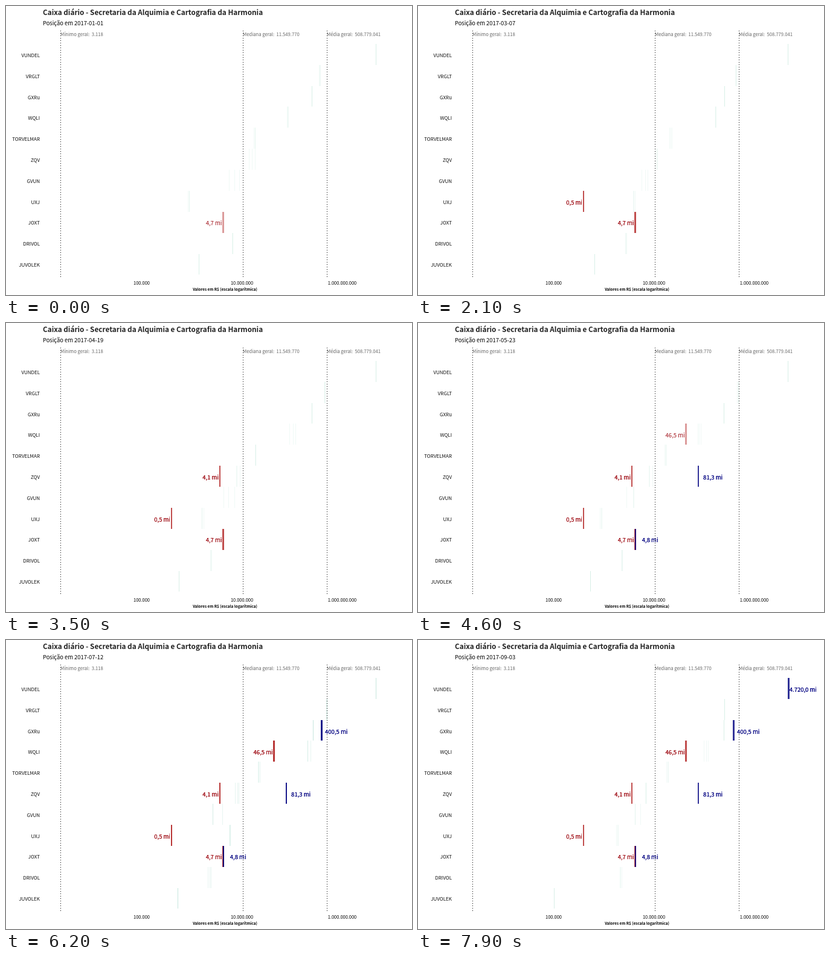
An HTML page with a canvas for the animation above (8000 ms loop, 672x480 px).

```html
<!DOCTYPE html>
<html lang="pt">
<head>
<meta charset="utf-8">
<title>Caixa diário</title>
<style>
  html, body { margin: 0; width: 672px; height: 480px; overflow: hidden; background: #fff; }
  canvas { display: block; }
</style>
</head>
<body>
<canvas id="stage" width="672" height="480"></canvas>
<script>
const ctx = document.getElementById('stage').getContext('2d');
const FAMILY = '"Noto Sans CJK JP", "Noto Sans CJK SC", "Noto Sans CJK", "Noto Sans", sans-serif';
const RED = '#b22222', NAVY = '#000080', TEAL = 'rgb(160,215,200)';
const TOP = 62.8, ROW = 34.87;
const STEP_MS = 100, STEPS = 80, DAYS_PER_STEP = 3.096, LATE_STEP = 68;
const LOWEST = 3118, DECADE = 84.6;

// Each balance is refilled once per period and then decays towards its low.
const ROWS = [
  { name: 'VUNDEL', low: 612 },
  { name: 'VRGLT', low: 533, gain: -13, decay: 35, period: STEPS, spread: 2, late: -25 },
  { name: 'GXRu', low: 503, gain: 6, refill: 8 },
  { name: 'WQLI', low: 430, gain: 72, refill: 14, spread: 6 },
  { name: 'TORVELMAR', low: 400, gain: 21, refill: 14, spread: 3 },
  { name: 'ZQV', low: 370, gain: 37, period: STEPS, spread: 6 },
  { name: 'GVUN', low: 330, gain: 48, decay: 18, period: 17.5, spread: 20 },
  { name: 'UXJ', low: 185, gain: 200, decay: 66, refill: 11, spread: 3 },
  { name: 'JOXT' },
  { name: 'DRIVOL', low: 337, gain: 38, decay: 12, period: STEPS, spread: 3 },
  { name: 'JUVOLEK', low: 283, gain: 36, decay: 15, period: STEPS, late: -58 }
];

// Record values in millions; each stays once reached.
const RECORDS = [
  { row: 8, start: 0, value: 4.7, color: RED },
  { row: 7, start: 7, value: 0.46, color: RED },
  { row: 5, start: 28, value: 4.06, color: RED },
  { row: 8, start: 40, value: 4.8, color: NAVY },
  { row: 5, start: 42, value: 81.3, color: NAVY },
  { row: 3, start: 46, value: 46.5, color: RED },
  { row: 2, start: 58, value: 400.5, color: NAVY },
  { row: 0, start: 68, value: 4720, color: NAVY }
];

const MARKS = [['Mínimo', LOWEST], ['Mediana', 11549770], ['Média', 508779041]];

const xOf = value => 90.5 + DECADE * Math.log10(value / LOWEST);

function format(value, digits = 0) {
  const [whole, part] = value.toFixed(digits).split('.');
  return whole.replace(/\B(?=(\d{3})+$)/g, '.') + (part ? ',' + part : '');
}

function random(...seed) {
  const v = Math.sin(seed.reduce((sum, n) => sum * 7.13 + n, 1) * 12.9898) * 43758.5453;
  return v - Math.floor(v);
}

function text(str, x, y, size, color, align = 'left', weight = 400) {
  ctx.font = `${weight} ${size}px ${FAMILY}`;
  ctx.textAlign = align;
  ctx.fillStyle = color;
  ctx.fillText(str, x, y);
}

function bar(row, x, width, color, alpha) {
  const left = Math.round(x - width / 2), right = Math.round(x + width / 2);
  const top = Math.round(TOP + ROW * row), bottom = Math.round(TOP + ROW * (row + 1));
  ctx.globalAlpha = alpha;
  ctx.fillStyle = color;
  ctx.fillRect(left, top, right - left, bottom - top);
  ctx.globalAlpha = 1;
}

function drawLabels(day) {
  text('Caixa diário - Secretaria da Alquimia e Cartografia da Harmonia', 61, 15, 11.75, '#222', 'left', 700);
  const date = new Date(Date.UTC(2017, 0, 1 + day)).toISOString().slice(0, 10);
  text('Posição em ' + date, 61, 32, 9.4, '#000');
  ROWS.forEach(({ name }, i) => text(name, 56, 85 + 34.8 * i, 8, '#111', 'right'));
  for (let i = 0; i < 3; i++) text(format(10 ** (5 + 2 * i)), 224.5 + 166 * i, 463, 7.45, '#000', 'center');
  text('Valores em R$ (escala logarítmica)', 362.5, 473, 6.35, '#000', 'center', 700);
}

function drawMarks() {
  ctx.strokeStyle = '#000';
  ctx.setLineDash([1, 3]);
  for (const [name, value] of MARKS) {
    const x = Math.floor(xOf(value));
    ctx.beginPath();
    ctx.moveTo(x + 0.5, 41);
    ctx.lineTo(x + 0.5, 450);
    ctx.stroke();
    text(`${name} geral:  ${format(value)}`, x, 50, 7.65, '#666');
  }
}

function position({ low, gain = 0, decay = 45, refill = 0, period = 46, late = 0 }, step) {
  const phase = (step - refill + period) % period;
  return low + gain * Math.exp(-phase / decay) + (step < LATE_STEP ? 0 : late);
}

function drawBalances(step, strong) {
  ROWS.forEach((row, i) => {
    if (!row.low) return;
    const x = position(row, step) + 0.5;
    // Neighbouring days show as fainter companions.
    for (let j = 0; j < 3; j++) {
      const shift = j ? (row.spread || 0) * (random(i, j, step >> 1) * 2 - 1) : 0;
      bar(i, x + shift, 1, TEAL, strong ? 0.25 : 0.16);
    }
  });
}

function drawRecords(step, strong) {
  for (const { row, start, value, color } of RECORDS) {
    if (step < start) continue;
    const fresh = step === start, low = color === RED;
    const x = xOf(value * 1e6);
    bar(row, x, 2.5, color, fresh ? 0.45 : strong ? 0.9 : 0.8);
    for (let pass = fresh ? 1 : 0; pass < 2; pass++) {
      text(format(value, 1) + ' mi', low ? x - 2 : x + 24, 86 + 34.8 * row, 9.5,
        low ? '#a01018' : NAVY, low ? 'right' : 'center');
    }
  }
}

function draw() {
  const step = Math.floor(performance.now() / STEP_MS) % STEPS;
  const strong = step % 6 === 2;
  ctx.fillStyle = '#fff';
  ctx.fillRect(0, 0, 672, 480);
  drawLabels(Math.round(step * DAYS_PER_STEP));
  drawBalances(step, strong);
  drawMarks();
  drawRecords(step, strong);
  requestAnimationFrame(draw);
}
draw();
</script>
</body>
</html>
```
